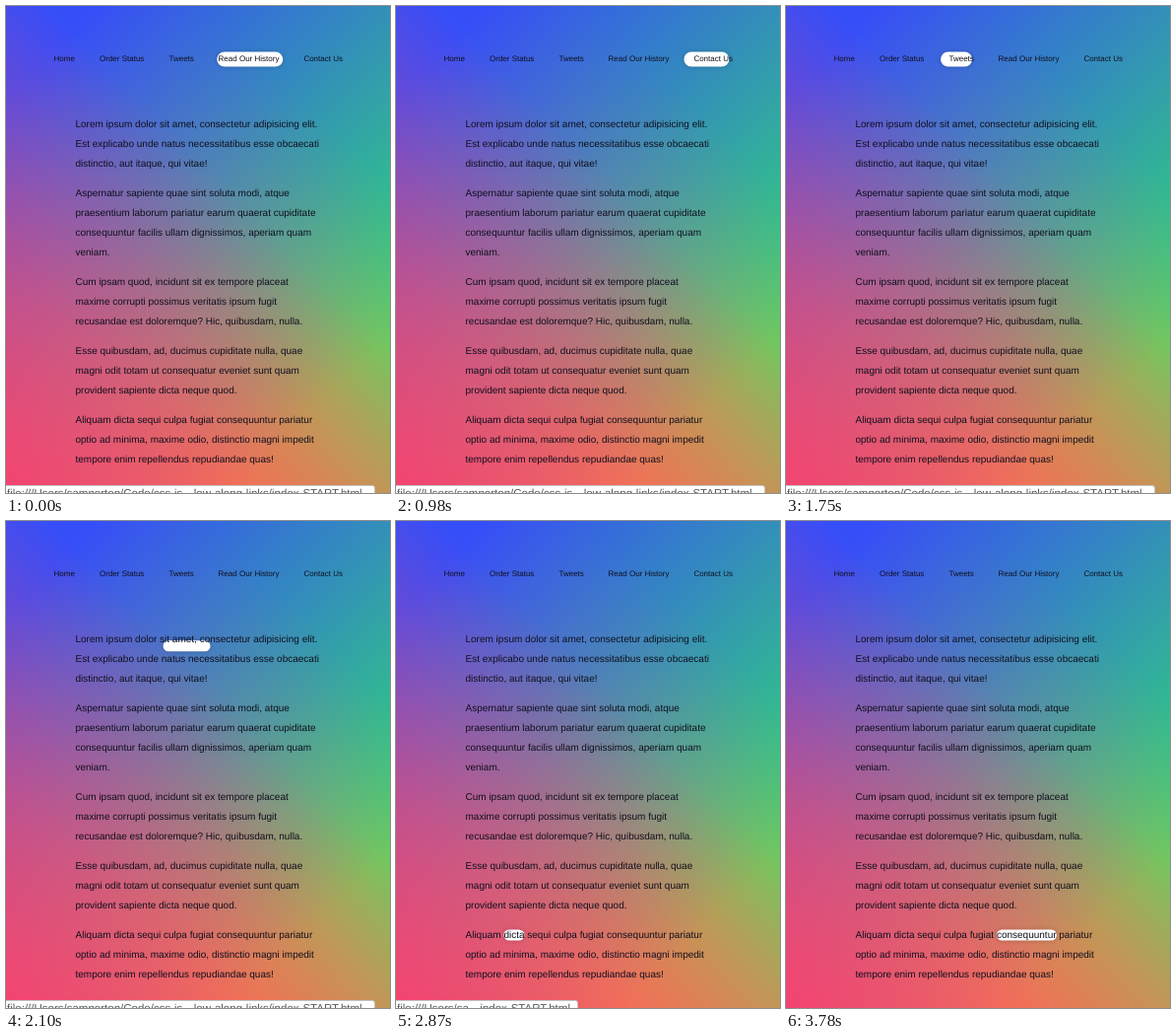
These frames come from a looping animation (390 by 494 pixels, 3.85 s). An HTML page:

```html
<!DOCTYPE html>
<html lang="en">
<head>
<meta charset="utf-8">
<title>Follow along links</title>
<style>
  html, body { margin: 0; width: 100%; height: 100%; overflow: hidden; }
  body {
    position: relative;
    color: #10101e;
    font: 10px/20px "Liberation Sans", Arial, sans-serif;
    text-rendering: geometricPrecision;
  }
  .page {
    position: absolute;
    width: 390px;
    height: 494px;
    overflow: hidden;
    background:
      linear-gradient(45deg, rgba(248, 64, 112, 1) 0%, rgba(248, 64, 112, 0) 62%),
      linear-gradient(135deg, rgba(54, 78, 248, 1) 10%, rgba(54, 78, 248, 0) 80%),
      linear-gradient(225deg, rgba(48, 218, 114, 1) 20%, rgba(48, 218, 114, 0) 72%),
      rgb(238, 162, 60);
    background-size: 390px 520px;
  }
  nav a {
    position: absolute;
    top: 46.5px;
    padding: .5px 2.5px 1.5px;
    margin-left: -2.5px;
    font-size: 8px;
    line-height: 13px;
    white-space: nowrap;
  }
  .text { position: absolute; left: 70.5px; top: 110.5px; white-space: nowrap; }
  p { margin: 0 0 10px; }
  .pill {
    position: absolute;
    left: 0;
    top: 0;
    background: #fff;
    border-radius: 10px;
    box-shadow: 0 0 5px rgba(0, 0, 0, .2);
  }
  .status {
    position: absolute;
    left: -10px;
    top: 486px;
    height: 20px;
    padding-left: 10px;
    box-sizing: border-box;
    border: 1px solid #c4c4c8;
    border-radius: 0 3px 0 0;
    background: #fff;
    color: #5c5c60;
    font-size: 11.5px;
    line-height: 17px;
    white-space: nowrap;
  }
</style>
</head>
<body>
<div class="page">
  <div class="pill"></div>
  <nav>
    <a id="home" style="left:48.5px">Home</a>
    <a id="order" style="left:95px">Order Status</a>
    <a id="tweets" style="left:165.5px">Tweets</a>
    <a id="history" style="left:215.6px">Read Our History</a>
    <a id="contact" style="left:302.4px">Contact Us</a>
  </nav>
  <div class="text">
    <p>Lorem ipsum dolor sit amet, <a id="consectetur">consectetur</a> adipisicing elit.<br>
    Est <a id="explicabo">explicabo</a> unde natus necessitatibus esse obcaecati<br>
    distinctio, aut itaque, qui vitae!</p>
    <p>Aspernatur sapiente quae sint soluta modi, atque<br>
    praesentium laborum pariatur earum quaerat cupiditate<br>
    consequuntur facilis ullam dignissimos, aperiam quam<br>
    veniam.</p>
    <p>Cum ipsam quod, incidunt sit ex tempore placeat<br>
    maxime <a id="corrupti">corrupti</a> possimus veritatis ipsum fugit<br>
    recusandae est doloremque? Hic, quibusdam, nulla.</p>
    <p>Esse quibusdam, ad, ducimus cupiditate nulla, quae<br>
    magni odit <a id="totam">totam</a> ut consequatur eveniet sunt quam<br>
    provident sapiente dicta neque quod.</p>
    <p>Aliquam <a id="dicta">dicta</a> sequi culpa fugiat <a id="consequuntur">consequuntur</a> pariatur<br>
    optio ad minima, maxime odio, distinctio magni impedit<br>
    tempore enim repellendus repudiandae quas!</p>
  </div>
  <div class="status"></div>
</div>
<script>
  const LOOP = 3850, STEP = 70, MOVE = 200;
  const LONG_PATH = 'file:///Users/samnorton/Code/css-js…low-along-links/index-START.html';
  const SHORT_PATH = 'file:///Users/sa…index-START.html';

  // Time the pointer enters each link
  const hovers = [
    [-170, 'history'], [30, 'tweets'], [85, 'order'], [140, 'home'],
    [300, 'order'], [560, 'tweets'], [700, 'history'], [850, 'contact'],
    [1050, 'history'], [1156, 'tweets'], [1356, 'order'], [1620, 'tweets'],
    [1780, 'consectetur'], [2056, 'explicabo'], [2340, 'corrupti'],
    [2480, 'totam'], [2620, 'dicta'], [3100, 'consequuntur']
  ];

  const pill = document.querySelector('.pill');
  const status = document.querySelector('.status');

  function boxOf(id) {
    const r = document.getElementById(id).getBoundingClientRect();
    return [r.left, r.top, r.width, r.height];
  }

  // CSS "ease": cubic-bezier(.25, .1, .25, 1)
  function ease(x) {
    if (x >= 1) return 1;
    const curve = (s, a, b) => 3 * a * s * (1 - s) ** 2 + 3 * b * s * s * (1 - s) + s ** 3;
    let lo = 0, hi = 1;
    for (let i = 0; i < 24; i++) {
      const mid = (lo + hi) / 2;
      if (curve(mid, .25, .25) < x) lo = mid; else hi = mid;
    }
    return curve(lo, .1, 1);
  }

  function poseIn(move, t) {
    const k = ease((t - move.start) / MOVE);
    return move.to.map((v, n) => move.from[n] + (v - move.from[n]) * k);
  }

  // A new hover takes over from wherever the pill is
  const moves = [];
  for (const [start, id] of hovers) {
    const last = moves[moves.length - 1];
    moves.push({ start, from: last ? poseIn(last, start) : boxOf('contact'), to: boxOf(id) });
  }

  function drawPill(t) {
    const move = moves.filter(m => m.start <= t).pop();
    const [x, y, w, h] = poseIn(move, t);
    pill.style.transform = `translate(${x}px, ${y}px)`;
    pill.style.width = w + 'px';
    pill.style.height = h + 'px';
  }

  function drawStatus(t) {
    const wide = t < 2380;
    status.textContent = wide ? LONG_PATH : SHORT_PATH;
    status.style.width = (wide ? 385 : 195) + 'px';
    status.style.opacity = Math.max(0, Math.min(1, (3740 - t) / 170));
  }

  function frame() {
    const t = Math.floor((performance.now() % LOOP) / STEP) * STEP;
    drawPill(t);
    drawStatus(t);
    requestAnimationFrame(frame);
  }
  frame();
</script>
</body>
</html>
```
